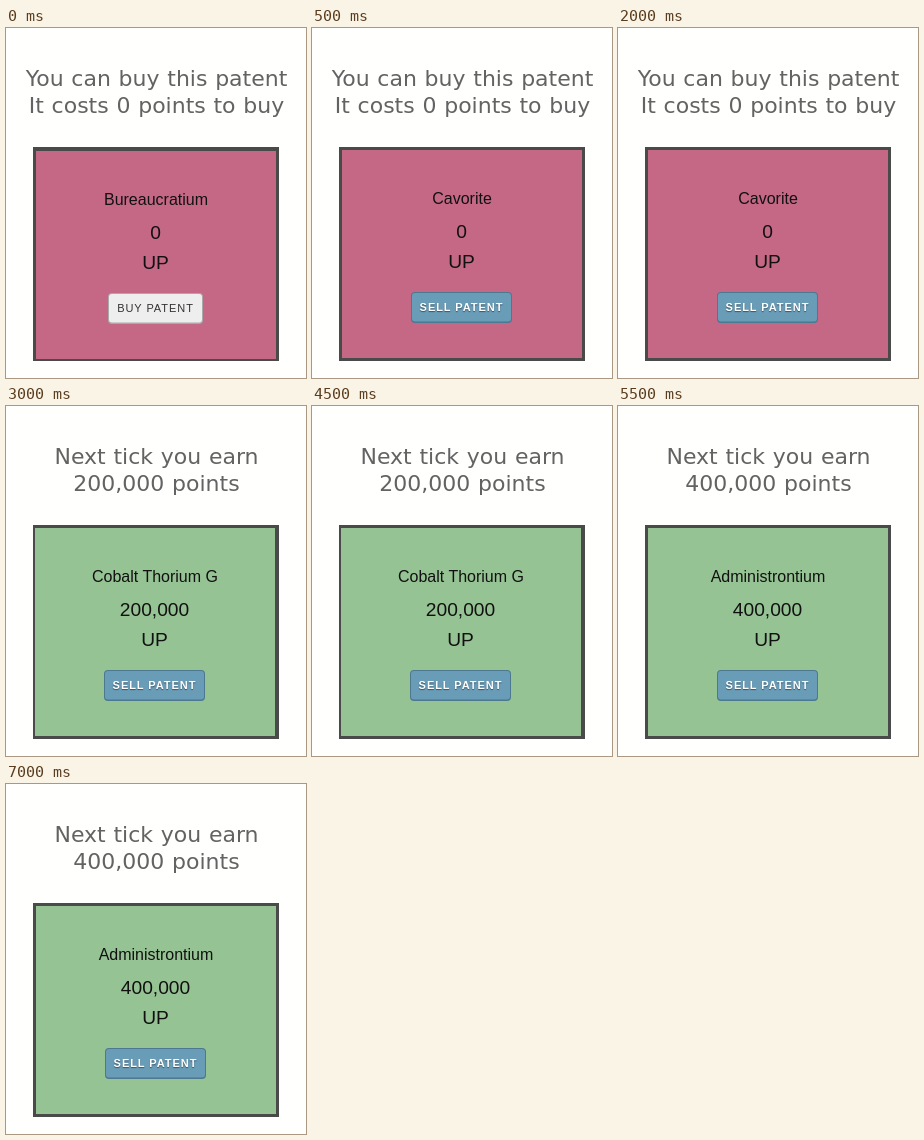
An HTML page for the animation above (8 s loop, 300 by 350 pixels).

```html
<!DOCTYPE html>
<html lang="en">
<head>
<meta charset="utf-8">
<title>Patent cards</title>
<style>
  html, body { margin: 0; width: 100%; height: 100%; overflow: hidden; background: #fffffd; }
  svg { display: block; width: 300px; height: 350px; }
  text { text-anchor: middle; font-family: "Liberation Sans", Arial, sans-serif; fill: #111; }
  .head text { font: 22px "DejaVu Sans", Verdana, sans-serif; word-spacing: .75px; fill: #636363; }
  .name { font-size: 16px; }
  .value { font-size: 19.2px; }
  .label { font-size: 11px; letter-spacing: .95px; }
  .buy .label { fill: #333; }
  .sell .label { fill: #fff; font-weight: bold; text-shadow: 0 1px 1px #355669; }
  .scene { visibility: hidden; animation: 8s step-end infinite; }
  #s0 { animation-name: first; }
  #s1 { animation-name: second; }
  #s2 { animation-name: third; }
  #s3 { animation-name: fourth; }
  @keyframes first { 0% { visibility: visible } 6.25%, 100% { visibility: hidden } }
  @keyframes second { 0% { visibility: hidden } 6.25% { visibility: visible } 37.5%, 100% { visibility: hidden } }
  @keyframes third { 0% { visibility: hidden } 37.5% { visibility: visible } 68.75%, 100% { visibility: hidden } }
  @keyframes fourth { 0% { visibility: hidden } 68.75%, 100% { visibility: visible } }
</style>
</head>
<body>
<svg id="stage" viewBox="0 0 300 350"></svg>
<script>
  const PINK = '#c46886', GREEN = '#96c393';
  const offer = ['You can buy this patent', 'It costs 0 points to buy'];
  const earn = points => ['Next tick you earn', points + ' points'];

  // dx, dy: small layout shift of the card's contents
  const scenes = [
    { head: offer, fill: PINK, name: 'Bureaucratium', value: '0', buy: true, dx: 0, dy: 1 },
    { head: offer, fill: PINK, name: 'Cavorite', value: '0', dx: 0, dy: 0 },
    { head: earn('200,000'), fill: GREEN, name: 'Cobalt Thorium G', value: '200,000', dx: -1, dy: 0 },
    { head: earn('400,000'), fill: GREEN, name: 'Administrontium', value: '400,000', dx: 0, dy: 0 }
  ];

  const text = (cls, x, y, str) => `<text class="${cls}" x="${x}" y="${y}">${str}</text>`;
  const box = (x, y, w, h, fill, r = 0) =>
    `<rect x="${x}" y="${y}" width="${w}" height="${h}" rx="${r}" fill="${fill}"/>`;

  // the bottom edge is thicker than the other sides
  const button = (cls, x, w, edge, face, label) => `
    <g class="${cls}">
      ${box(x, 264, w, 31, edge, 4)}
      ${box(x + 1, 265, w - 2, 28.5, face, 3)}
      ${text('label', x + w / 2, 283, label)}
    </g>`;

  const scene = ({ head, fill, name, value, buy, dx, dy }, i) => `
    <g class="scene" id="s${i}">
      <g class="head">${head.map((line, n) => text('', 150.5, 58 + 27 * n, line)).join('')}</g>
      ${box(27, 119, 246, 214, '#4b4a4b')}
      <g transform="translate(${dx} ${dy})">
        ${box(30, 122, 240, 208, fill)}
        ${text('name', 150, 176, name)}
        ${text('value', 149.5, 210, value)}
        ${text('value', 149.5, 240, 'UP')}
        ${buy ? button('buy', 102, 95, '#aaa', '#eee', 'BUY PATENT')
              : button('sell', 99, 101, '#4c7890', '#699cb7', 'SELL PATENT')}
      </g>
    </g>`;

  document.getElementById('stage').innerHTML = scenes.map(scene).join('');
</script>
</body>
</html>
```
